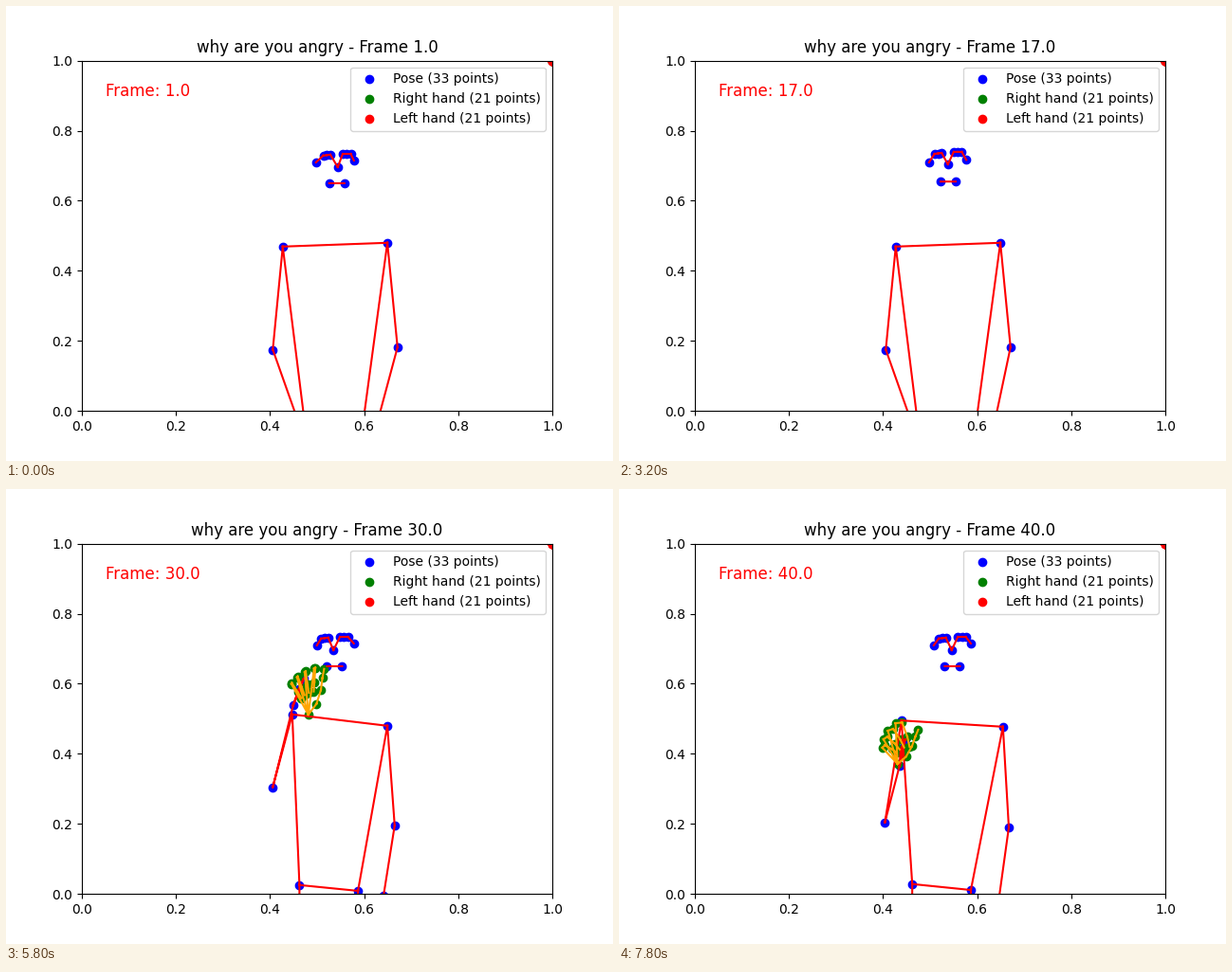
Write a matplotlib script that moves like this. It is 640 px wide and 480 px high and loops after 8000 ms.

```python
import numpy as np
import matplotlib.pyplot as plt
from matplotlib.animation import FuncAnimation

FRAMES, STEP = 40, 200
HAND_START, HAND_LOST = 23, (37, 38)
KEYS = (19, 25, 30, 34, 40)   # rest, arm rising, top, hold, lowering

POSE_LINKS = [(0, 1), (1, 2), (2, 3), (3, 7), (0, 4), (4, 5), (5, 6), (6, 8),
              (9, 10), (11, 12), (23, 24)]
for s in (0, 1):  # the same limbs on both sides
    POSE_LINKS += [(a + s, b + s) for a, b in (
        (11, 13), (13, 15), (15, 17), (15, 19), (15, 21), (17, 19),
        (11, 23), (23, 25), (25, 27), (27, 29), (29, 31))]
HAND_LINKS = [(0 if k % 4 == 1 else k - 1, k) for k in range(1, 21)]


def at(n, *values):
    return np.interp(n, KEYS, values)


def head(n):
    """Face points; those nearer the viewer move more as the head turns."""
    drift = np.interp(n, [17, 25, 30, 40], [0, 1, 1, 5])
    turn = np.interp(n, [1, 12, 17, 25, 34, 40], [0, -3, -3, -5, -6, -4])
    nod = np.interp(n, [1, 12, 17, 30], [0, -3, -3, 0])

    def place(x, y, depth):
        return x + drift + depth * turn, y + depth * nod

    eyes = [place(359.5 + d, 156, 0.7) for d in (-4.3, 0, 4.2)]
    eyes += [place(338.5 + d, 157.3 - d / 8, 0.6) for d in (3.7, 0, -3.8)]
    ears = [place(367, 163, 0.2), place(327, 165, 0)]
    mouth = [place(357, 187, 0.6), place(341, 187, 0.6)]
    return [place(350, 170, 1)] + eyes + ears + mouth


def body(n):
    """All 33 pose landmarks in screen pixels."""
    lift = at(n, 0, 0.1, 1, 1.15, 0.6)      # shoulder of the raised arm
    rise = at(n, 0, 0.35, 0.92, 1, 0.95)    # hips
    fold = at(n, 0, 0, 1, 0.96, 0.22)       # elbow of the raised arm
    tilt = at(n, 0, 0, 0, 0, 1)

    shoulders = [(402.3 + 2.7 * tilt, 249.8 + tilt),
                 (292 + 10 * lift, 253.8 - 16 * lift)]
    elbows = [(413 - 3 * lift, 360 - 5 * lift),
              (281.5 - tilt, 362.5 - 48 * fold)]
    wrists = [(np.interp(n, [1, 25, 40], [391, 398, 399]),
               at(n, 442, 428, 428.5, 429.5, 445)),
              (at(n, 323, 299, 303, 308, 296),
               at(n, 480, 316, 228, 234, 292))]
    near, far = wrists
    fingers = []
    for dx, dy in ((6, 17), (11, 28), (9, 20)):
        fingers += [(near[0] - dx / 2, near[1] + dy),
                    (far[0] + dx - 5 * tilt, far[1] - dy)]
    hips = [(375 - 4 * rise, 452 - 30.5 * rise),
            (316.4 - 7.4 * rise, 450 - 35 * rise)]
    legs = [(x, y + 110 * k) for k in range(1, 5) for x, y in hips]
    return np.array(head(n) + shoulders + elbows + wrists
                    + fingers + hips + legs)


def hand(n):
    """21 landmarks: a fan of curled fingers around the wrist."""
    close = at(n, 0, 0, 1, 1, 1)
    turn = at(n, 0, 0, 0, 0, 1)
    wrist = np.array([at(n, 335, 311, 319, 318, 294),
                      at(n, 470, 306, 238, 245, 290)])
    joint = np.arange(4)

    # thumb
    angle = [17 + 2 * close + 12 * turn + 2 * (3 - joint) ** 2]
    radius = [(59 - 8 * close - 9 * turn) * np.array([0.28, 0.57, 0.81, 1])]
    # index to little finger: knuckle, then joints curling back
    curl = (np.array([1, 1.02, 0.71, 0.51])
            + (1 - close) * np.array([0, 0.18, 0.24, 0.2]))
    twist = (11 - 5 * close + 32 * turn) * (joint / 3) ** 1.3
    for k in range(4):
        angle.append(7 - 10 * turn - k * (7 + 5 * close + 1.5 * turn) + twist)
        radius.append((49 - 6 * turn - k * (4 + 2.5 * turn)) * curl)

    a, r = np.radians(np.ravel(angle)), np.ravel(radius)
    tips = wrist + np.column_stack([r * np.sin(a), -r * np.cos(a)])
    return np.vstack([wrist, tips])


def to_axes(p):
    return np.column_stack([(p[:, 0] - 80.2) / 496, (427.2 - p[:, 1]) / 369.6])


def path(points, links):
    """One polyline with gaps between the links."""
    gap = [np.nan, np.nan]
    return np.array([q for a, b in links for q in (points[a], points[b], gap)]).T


fig, ax = plt.subplots(figsize=(6.4, 4.8), dpi=100)
ax.set(xlim=(0, 1), ylim=(0, 1))
corner = np.ones((21, 2))     # where a hand that is not seen ends up
pose_dots = ax.scatter([], [], c="blue", label="Pose (33 points)")
right_dots = ax.scatter([], [], c="green", label="Right hand (21 points)")
ax.scatter(*corner.T, c="red", label="Left hand (21 points)")
pose_line, = ax.plot([], [], color="red")
hand_line, = ax.plot([], [], color="orange")
label = ax.text(0.05, 0.9, "", color="red", fontsize=12)
title = ax.set_title("")
ax.legend(loc="upper right")


def update(frame):
    n = frame + 1
    pose = to_axes(body(n))
    pose_dots.set_offsets(pose)
    pose_line.set_data(*path(pose, POSE_LINKS))

    seen = n >= HAND_START and n not in HAND_LOST
    right = to_axes(hand(n)) if seen else corner
    right_dots.set_offsets(right)
    hand_line.set_data(*(path(right, HAND_LINKS) if seen else ([], [])))

    label.set_text(f"Frame: {n:.1f}")
    title.set_text(f"why are you angry - Frame {n:.1f}")
    return pose_dots, right_dots, pose_line, hand_line, label, title


anim = FuncAnimation(fig, update, frames=FRAMES, interval=STEP, repeat=True)
plt.show()
```
